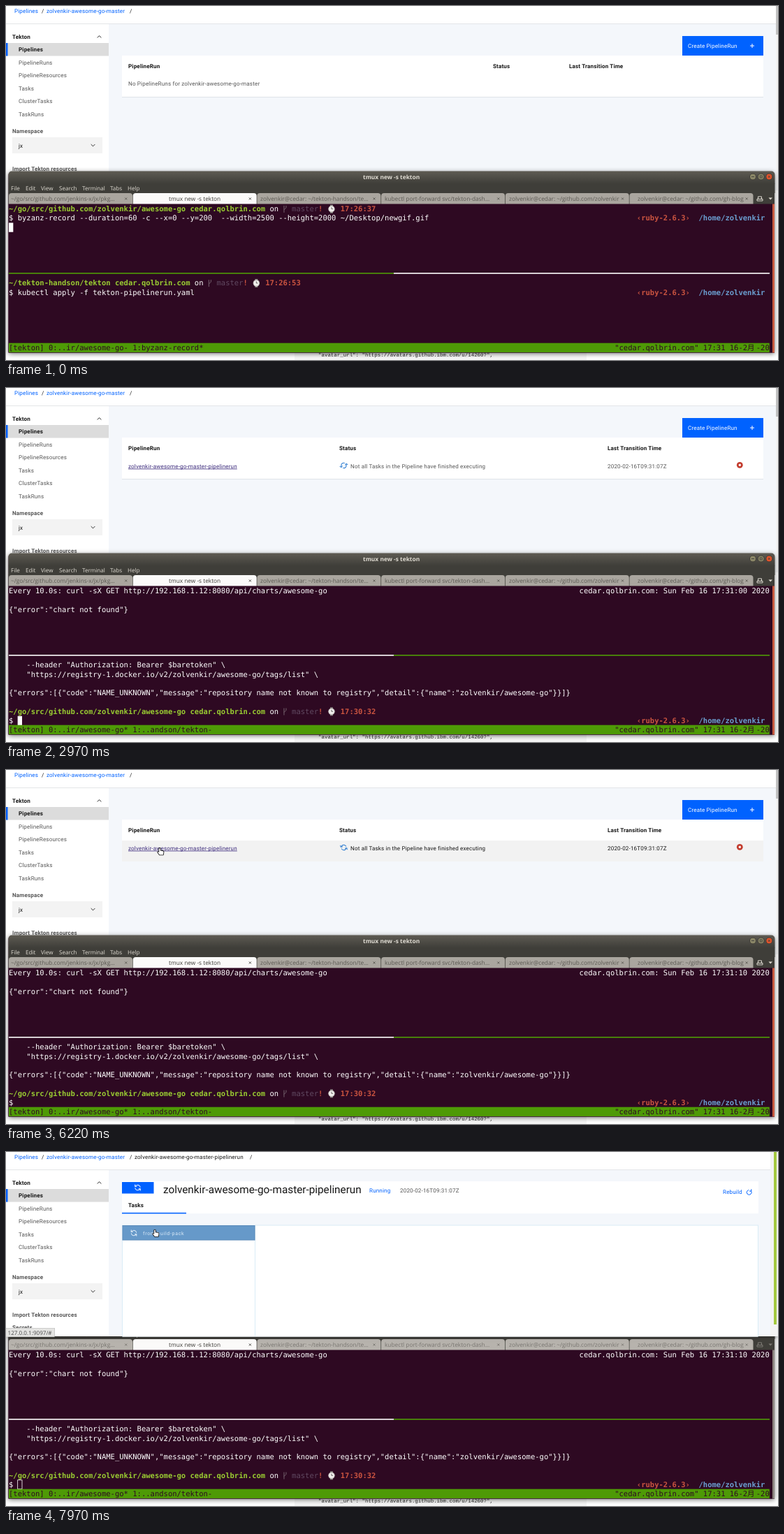
An HTML page with a canvas for the animation above (8 s loop, 1105 by 507 pixels).

```html
<!DOCTYPE html>
<html lang="en">
<head>
<meta charset="utf-8">
<title>Pipeline run</title>
<style>
html, body { margin: 0; width: 100%; height: 100%; overflow: hidden; background: #fff; }
canvas { display: block; }
</style>
</head>
<body>
<canvas id="stage" width="1105" height="507"></canvas>
<script>
const ctx = document.getElementById('stage').getContext('2d');
ctx.textRendering = 'geometricPrecision';
const LOOP = 8000;
const USER = 'zolvenkir', HOST = 'cedar.qolbrin.com', BOX = 'cedar';
const PIPE = USER + '-awesome-go-master', RUN = PIPE + '-pipelinerun';

// Moments of the story, in ms
const PANE = 680, ENTER = 1440, CREATED = 1830, PROMPT = 1890, ROW = 2250,
      SWITCH = 2790, TICK = 4780, CLICK = 6290, LOADED = 6550, TASK = 6920;
const BLINK = 580;

const BLUE = '#0062ff', INK = '#171717', GREY = '#565656', PAGE = '#f4f7fb';
const WHITE = '#fff', LIME = '#9acd32', RUST = '#cb5440', SKY = '#6b9fd1',
      GREEN = '#4e9a06', WINE = '#2e0922', DARK = '#3f3e39';

function rect(x, y, w, h, color) {
  ctx.fillStyle = color;
  ctx.fillRect(x, y, w, h);
}

function line(points, color, width = 1) {
  ctx.strokeStyle = color;
  ctx.lineWidth = width;
  ctx.beginPath();
  points.forEach(([x, y], i) => i ? ctx.lineTo(x, y) : ctx.moveTo(x, y));
  ctx.stroke();
}

function disc(x, y, r, color) {
  ctx.fillStyle = color;
  ctx.beginPath();
  ctx.arc(x, y, r, 0, Math.PI * 2);
  ctx.fill();
}

function write(str, x, y, color, font, spacing) {
  ctx.font = font;
  ctx.letterSpacing = spacing + 'px';
  ctx.fillStyle = color;
  ctx.fillText(str, x, y);
}

// Web page text; y is the middle of the line
function web(str, x, y, color = GREY, weight = 400, size = 8.07, spacing = 0.16) {
  write(str, x, y + size * 0.36, color, `${weight} ${size}px Roboto, sans-serif`, spacing);
}

function ui(str, x, y, color, weight = 400, size = 8.3) {
  write(str, x, y + size * 0.36, color, `${weight} ${size}px "Open Sans", sans-serif`, 0);
}

function chevron(x, y, dir) {
  line([[x - 2.8, y - 1.4 * dir], [x, y + 1.4 * dir], [x + 2.8, y - 1.4 * dir]], INK, 0.9);
}

function syncIcon(x, y, angle, color) {
  ctx.save();
  ctx.translate(x, y);
  ctx.rotate(angle);
  for (let i = 0; i < 2; i++) {
    ctx.strokeStyle = color;
    ctx.lineWidth = 1;
    ctx.beginPath();
    ctx.arc(0, 0, 3.7, -2.6, -0.1);
    ctx.stroke();
    line([[-3.9, -4.4], [-3.9, -1.7], [-1.2, -1.7]], color, 1);
    ctx.rotate(Math.PI);
  }
  ctx.restore();
}

const spin = t => (t - 4310) / 2000 * Math.PI * 2;

// ---- Browser ----

function sidebar() {
  rect(0, 26, 147, 238, WHITE);
  web('Tekton', 9, 44, INK, 600);
  chevron(133.5, 44, -1);
  rect(0, 53, 147, 18.5, '#dcdcdc');
  rect(0, 53, 2.5, 18.5, BLUE);
  web('Pipelines', 18, 62.5, INK, 600);
  ['PipelineRuns', 'PipelineResources', 'Tasks', 'ClusterTasks', 'TaskRuns']
    .forEach((name, i) => web(name, 18, 81 + i * 18.45));
  web('Namespace', 9, 179, GREY, 600);
  rect(9, 188, 129, 23, '#f3f3f3');
  web('jx', 18, 200, INK);
  chevron(124.5, 199.5, 1);
  web('Import Tekton resources', 9, 233, GREY, 600);
  web('Secrets', 9, 251.5, GREY, 600);
}

function breadcrumb(t) {
  web('Pipelines', 12, 7.5, BLUE);
  web('/', 51, 7.5, INK);
  web(PIPE, 58, 7.5, BLUE);
  web('/', 177, 7.5, INK);
  if (t >= CLICK) {
    web(RUN, 184, 7.5, INK);
    web('/', 349, 7.5, INK);
  }
}

function runList(t, hover) {
  rect(968, 43, 116, 28, BLUE);
  web('Create PipelineRun', 976, 57.5, WHITE);
  line([[1065, 57], [1071, 57]], WHITE);
  line([[1068, 54], [1068, 60]], WHITE);
  rect(166, 71, 918, 60, WHITE);
  rect(166, 130, 918, 1, '#dfe3e8');
  const ready = t >= ROW;
  web('PipelineRun', 175, 86, INK, 600);
  web('Status', ready ? 477 : 697, 86, INK, 600);
  web('Last Transition Time', ready ? 861 : 806, 86, INK, 600);
  if (!ready) {
    web('No PipelineRuns for ' + PIPE, 175, 111.5);
    return;
  }
  if (hover) rect(166, 101, 918, 30, '#f2f2f2');
  const ink = hover ? INK : GREY;
  web(RUN, 175, 112, '#41307f');
  rect(175, 115.6, ctx.measureText(RUN).width, 0.8, '#41307f');
  syncIcon(483.5, 111, spin(t), '#2b7bd0');
  web('Not all Tasks in the Pipeline have finished executing', 493, 112, ink);
  web('2020-02-16T09:31:07Z', 861, 112, ink);
  disc(1050.3, 110.3, 4.4, '#c23a2c');
  rect(1048.8, 108.8, 3, 3, WHITE);
}

function skeleton() {
  rect(166, 43, 918, 142, WHITE);
  for (let i = 0; i < 6; i++) rect(166, 66 + i * 23.6, 918, 1, '#e0e2e5');
  [[175, 90], [313, 376], [833, 181]].forEach(([x, w]) => rect(x, 52.5, w, 9, '#e2e2e2'));
}

function runPage(t) {
  rect(166, 42, 911, 46, WHITE);
  rect(166, 43, 45.5, 16.5, BLUE);
  syncIcon(188.5, 51, spin(t) + 1.1, WHITE);
  web(RUN, 225, 53, INK, 400, 15.3, 0);
  web('Running', 520, 55.5, BLUE);
  web('2020-02-16T09:31:07Z', 564, 55.5);
  web('Tasks', 175, 76, INK, 600);
  rect(166, 86.8, 92, 1.6, BLUE);
  web('Rebuild', 1026, 57.5, BLUE);
  ctx.strokeStyle = BLUE;
  ctx.lineWidth = 1;
  ctx.beginPath();
  ctx.arc(1063.7, 57.8, 3.4, -0.7, 4.6);
  ctx.stroke();
  line([[1066.8, 53.2], [1066.8, 56], [1064, 56]], BLUE);

  rect(166, 104.5, 911, 160, '#d9ecf6');
  rect(167, 105.5, 909, 159, WHITE);
  rect(356, 105, 1, 159, '#d9ecf6');
  rect(166.5, 105, 190, 21.5, '#5584b4');
  rect(167.3, 105.8, 188.4, 19.9, '#6699c9');
  syncIcon(183, 116, spin(t) + 1.1, '#e6f1fb');
  web('from-build-pack', 196, 116.5, '#dcebf8', 400, 7, 0.7);
}

function urlHint(str, width) {
  rect(0, 252, width, 12.5, '#c4c4c4');
  rect(0, 252.7, width - 0.8, 12, '#e4e4e2');
  ui(str, 2.5, 258.8, '#4a4a4a', 400, 8.1);
}

function browser(t, hover) {
  rect(0, 0, 1105, 264, WHITE);
  rect(0, 25, 1102, 1, '#e3e5e8');
  rect(147, 26, 955, 238, PAGE);
  breadcrumb(t);
  sidebar();
  if (t < CLICK) runList(t, hover);
  else if (t < LOADED) skeleton();
  else runPage(t);

  if (t < LOADED) {
    rect(1102, 0, 3, 264, '#f3f3f3');
    rect(1102, 0, 3, 41, '#c2c2c2');
  } else {
    rect(1094, 0, 11, 264, '#f3f3f3');
    rect(1099, 0, 4, 247, '#a4c83f');
  }
  if (t >= CLICK && t < LOADED)
    urlHint(`127.0.0.1:9097/#/namespaces/jx/pipelines/${PIPE}/runs/${RUN}`, 470);
  else if (t >= TASK) urlHint('127.0.0.1:9097/#', 70);
}

// ---- Terminal ----

const CW = 6.33, CH = 13.28, LEFT = 4, TOP = 283.9;
const cellX = col => LEFT + col * CW;
const cellY = row => TOP + row * CH;

function cells(row, col, str, color = WHITE, bold = false) {
  ctx.font = `${bold ? 700 : 400} 10.51px "DejaVu Sans Mono", "Noto Sans CJK SC", monospace`;
  ctx.letterSpacing = '0px';
  ctx.fillStyle = color;
  for (const ch of str) {
    ctx.fillText(ch, cellX(col), cellY(row) + 10.3);
    col += ch > '\u2fff' ? 2 : 1;
  }
}

function prompt(row, path, time) {
  const head = `${path} ${HOST}`;
  const col = head.length + 1;
  cells(row, 0, head, LIME, true);
  cells(row, col, 'on');
  const x = cellX(col + 3), y = cellY(row);
  line([[x + 1.5, y + 2], [x + 1.5, y + 12]], '#75636f', 1);
  line([[x + 1.5, y + 8], [x + 4.5, y + 5], [x + 4.5, y + 2]], '#75636f', 1);
  cells(row, col + 5, 'master', '#614a62');
  cells(row, col + 11, '!', RUST, true);
  const cx = cellX(col + 13) + 6.2, cy = y + 6.8;
  rect(cx - 2, cy - 6, 4, 12, '#8f8a88');
  disc(cx, cy, 4.7, '#c9c5c2');
  disc(cx, cy, 3.6, '#f1efed');
  line([[cx, cy - 2.5], [cx, cy], [cx + 2, cy]], '#4a4545', 0.8);
  cells(row, col + 16, time, RUST, true);
}

function rightPrompt(row) {
  cells(row, 142, '‹ruby-2.6.3›', RUST, true);
  cells(row, 156, '/home/' + USER, SKY, true);
}

function caret(row, col, t, since, hollow) {
  const x = cellX(col), y = cellY(row);
  if (hollow) {
    ctx.strokeStyle = WHITE;
    ctx.lineWidth = 0.8;
    ctx.strokeRect(x, y, CW, CH - 0.4);
  } else if ((t - since) % (2 * BLINK) < BLINK) {
    rect(x, y, CW, CH, WHITE);
  }
}

const GO_DIR = `~/go/src/github.com/${USER}/awesome-go`;
const LAB_DIR = '~/tekton-handson/tekton';

function recordWindow(t) {
  prompt(0, GO_DIR, '17:26:37');
  cells(1, 0, '$ byzanz-record --duration=60 -c --x=0 --y=200  --width=2500 --height=2000 ~/Desktop/newgif.gif');
  rightPrompt(1);
  prompt(8, LAB_DIR, '17:26:53');
  cells(9, 0, '$ kubectl apply -f tekton-pipelinerun.yaml');
  rightPrompt(9);
  if (t >= CREATED) cells(10, 0, `pipelinerun.tekton.dev/${RUN} created`);
  if (t >= PROMPT) {
    prompt(12, LAB_DIR, '17:31:07');
    cells(13, 0, '$');
    rightPrompt(13);
  }
  if (t < PANE) caret(2, 0, 0, 0);
  else if (t < ENTER) caret(9, 43, t, PANE);
  else if (t < CREATED) caret(10, 0, t, ENTER);
  else if (t < PROMPT) caret(11, 0, t, CREATED);
  else caret(13, 2, t, PROMPT);
}

function watchWindow(t) {
  cells(0, 0, 'Every 10.0s: curl -sX GET http://192.168.1.12:8080/api/charts/awesome-go');
  cells(0, 129, `${HOST}: Sun Feb 16 17:31:${t < TICK ? '00' : '10'} 2020`);
  cells(2, 0, '{"error":"chart not found"}');
  cells(8, 4, '--header "Authorization: Bearer $baretoken" \\');
  cells(9, 4, `"https://registry-1.docker.io/v2/${USER}/awesome-go/tags/list" \\`);
  cells(11, 0, '{"errors":[{"code":"NAME_UNKNOWN","message":"repository name not known to registry",' +
    `"detail":{"name":"${USER}/awesome-go"}}]}`);
  prompt(13, GO_DIR, '17:30:32');
  cells(14, 0, '$');
  rightPrompt(14);
  caret(14, 2, t, SWITCH, t >= CLICK);
}

function statusBar(t) {
  rect(LEFT, cellY(15) - 0.4, CW * 172, CH, GREEN);
  const job = t < ENTER ? 'byzanz-record' : t < CREATED ? 'kubectl' : '..andson/tekton';
  const [a, b] = t < SWITCH ? '-*' : '*-';
  cells(15, 0, `[tekton] 0:..${USER.slice(-2)}/awesome-go${a} 1:${job}${b}`, WINE);
  cells(15, 137, `"${HOST}" 17:31 16-2月-20`, WINE);
}

function tabs(focused) {
  rect(3.5, 267, 1096.5, 17, DARK);
  const names = [
    ['~/go/src/github.com/jenkins-x/jx/pkg…', 7],
    ['tmux new -s tekton', 233],
    [`${USER}@${BOX}: ~/tekton-handson/te…`, 364],
    ['kubectl port-forward svc/tekton-dash…', 542],
    [`${USER}@${BOX}: ~/github.com/${USER}`, 720],
    [`${USER}@${BOX}: ~/github.com/gh-blog`, 904]
  ];
  names.forEach(([name, x], i) => {
    const left = 4 + i * 177.7, active = i === 1;
    const ink = active ? '#3c3b37' : focused ? '#5b5852' : '#77746f';
    ctx.fillStyle = active ? '#fbfaf9' : focused ? '#aaa69f' : '#b7b3ad';
    ctx.beginPath();
    ctx.roundRect(left, 268, 177, 16, [4, 4, 0, 0]);
    ctx.fill();
    ui(name, x, 276, ink);
    const cx = left + 167.7;
    line([[cx - 1.5, 274.5], [cx + 1.5, 277.5]], ink, 0.9);
    line([[cx - 1.5, 277.5], [cx + 1.5, 274.5]], ink, 0.9);
  });
  const ink = focused ? '#dfdbd2' : '#7d7a74';
  line([[1076.5, 276], [1076.5, 273], [1081.5, 273], [1081.5, 276]], ink, 1);
  line([[1075, 276.5], [1083, 276.5], [1083, 279], [1075, 279], [1075, 276.5]], ink, 1);
  ctx.fillStyle = ink;
  ctx.beginPath();
  ctx.moveTo(1091.5, 274.5);
  ctx.lineTo(1097, 274.5);
  ctx.lineTo(1094.2, 277.5);
  ctx.fill();
}

function titleBar() {
  const shade = ctx.createLinearGradient(0, 237, 0, 254);
  shade.addColorStop(0, '#5d5a52');
  shade.addColorStop(1, '#403f3a');
  ctx.fillStyle = shade;
  ctx.beginPath();
  ctx.roundRect(3.5, 236.5, 1097, 18, [5, 5, 0, 0]);
  ctx.fill();
  ui('tmux new -s tekton', 511, 245, '#dfdbd2', 700, 8.4);
  [[1069, '#8b8768'], [1080.7, '#8b8768'], [1092.3, '#e2552d']].forEach(([x, color]) => {
    disc(x, 244.5, 4.7, '#34332e');
    disc(x, 244.5, 4, color);
  });
  line([[1067, 244.5], [1071, 244.5]], DARK, 0.9);
  ctx.strokeRect(1079.2, 243, 3, 3);
  line([[1090.8, 243], [1093.8, 246]], DARK, 0.9);
  line([[1090.8, 246], [1093.8, 243]], DARK, 0.9);
  rect(3.5, 254, 1097, 14, DARK);
  [['File', 7], ['Edit', 28], ['View', 50], ['Search', 76], ['Terminal', 109], ['Tabs', 149], ['Help', 174]]
    .forEach(([name, x]) => ui(name, x, 261, '#dfdbd2', 400, 8.1));
}

function terminal(t) {
  const focused = t < CLICK;
  ctx.save();
  ctx.shadowColor = 'rgba(0,0,0,.55)';
  ctx.shadowBlur = 7;
  ctx.shadowOffsetY = 1.5;
  ctx.fillStyle = WINE;
  ctx.beginPath();
  ctx.roundRect(3.5, 237, 1096.5, 259.6, [5, 5, 0, 0]);
  ctx.fill();
  ctx.restore();
  titleBar();
  tabs(focused);
  rect(3.5, 283.5, 1096.5, 213, WINE);
  rect(1097, 283.5, 3, 213, focused ? '#c75a40' : '#8b8580');
  const [l, r] = t < PANE ? [GREEN, WHITE] : [WHITE, GREEN];
  rect(4, 382, 551, 1.6, l);
  rect(555, 382, 538, 1.6, r);
  if (t < SWITCH) recordWindow(t);
  else watchWindow(t);
  statusBar(t);
}

function backdrop() {
  rect(0, 0, 1105, 507, WHITE);
  rect(413, 480, 418, 27, '#f6f6f6');
  write('"avatar_url": "https://avatars.github.ibm.com/u/14260?",', 447, 501.6, '#2b2b2b',
    '400 7.44px "Liberation Mono", monospace', 0);
}

// ---- Pointer ----

const TRACK = [
  [4000, 220, 330], [4310, 193, 264], [5300, 215, 126], [5700, 219, 111], [6900, 219, 112],
  [7250, 296, 119], [7420, 303, 122], [7680, 272, 121], [7970, 212, 111]
];

function pointerAt(t) {
  if (t < TRACK[0][0]) return null;
  const i = TRACK.findIndex(k => k[0] > t);
  if (i < 0) return TRACK[TRACK.length - 1].slice(1);
  const [t0, x0, y0] = TRACK[i - 1], [t1, x1, y1] = TRACK[i];
  const u = (t - t0) / (t1 - t0), s = u * u * (3 - 2 * u);
  return [x0 + (x1 - x0) * s, y0 + (y1 - y0) * s];
}

function pointer([x, y], hand) {
  const shape = hand
    ? 'M.2 1Q1 0 1.8 1V4.2L5.6 4.8Q6.7 5 6.5 6.2L5.9 10H.9L-1.7 6.6Q-1.8 5.5-.6 5.9L.2 6.6Z'
    : 'M0 0V9.2L2.1 7.3 3.5 10.4 5 9.7 3.6 6.7H6.5Z';
  const path = new Path2D(shape);
  ctx.save();
  ctx.translate(x, y);
  ctx.lineJoin = 'round';
  ctx.lineWidth = 1.7;
  ctx.strokeStyle = '#111';
  ctx.stroke(path);
  ctx.fillStyle = WHITE;
  ctx.fill(path);
  ctx.restore();
}

function draw(t) {
  const at = pointerAt(t);
  const hover = at && t < CLICK && at[1] < 131;
  backdrop();
  if (t < CLICK) {
    browser(t, hover);
    terminal(t);
  } else {
    terminal(t);
    ctx.save();
    ctx.shadowColor = 'rgba(0,0,0,.5)';
    ctx.shadowBlur = 6;
    rect(0, 0, 1105, 264, WHITE);
    ctx.restore();
    browser(t, false);
  }
  if (at) pointer(at, t >= TASK || (hover && at[1] < 117));
}

function tick(now) {
  draw(now % LOOP);
  requestAnimationFrame(tick);
}
requestAnimationFrame(tick);
</script>
</body>
</html>
```
